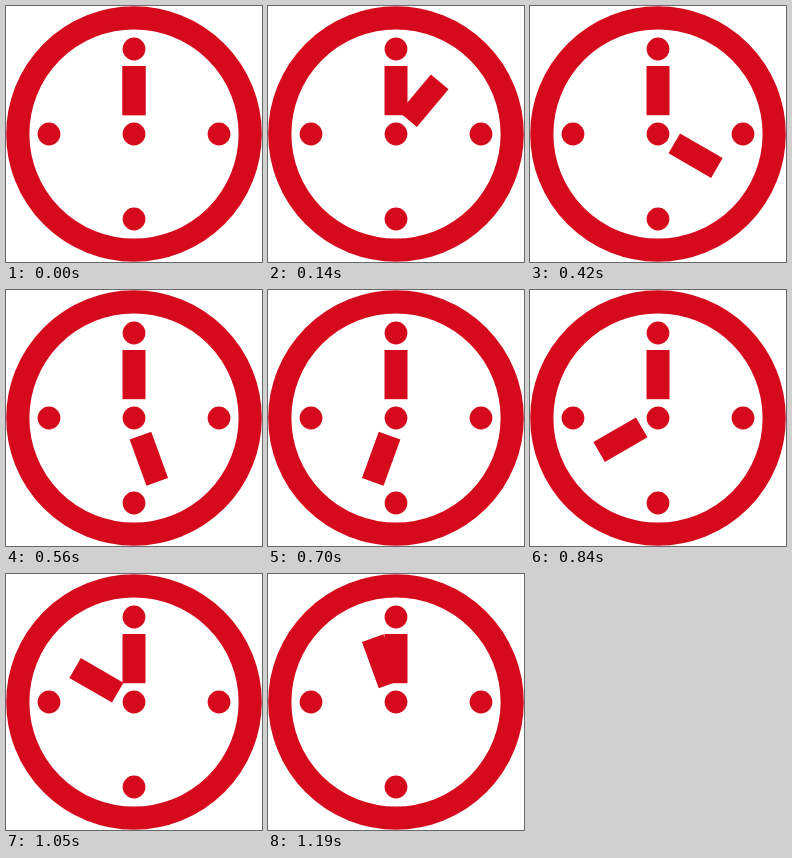
An HTML page for the animation above (1.26 s loop, 256 by 256 pixels).

```html
<!DOCTYPE html>
<html lang="en">
<head>
<meta charset="utf-8">
<title>Clock</title>
<style>
  html, body { margin: 0; width: 100%; height: 100%; overflow: hidden; background: #fff; }
  svg { display: block; width: 100%; height: 100%; }
</style>
</head>
<body>
<svg viewBox="-128 -128 256 256" fill="#d50b1d">
  <circle r="116.2" fill="none" stroke="#d50b1d" stroke-width="23.2"/>
  <circle r="11.4"/>
  <circle cy="-85" r="11.4"/>
  <circle cx="85" r="11.4"/>
  <circle cy="85" r="11.4"/>
  <circle cx="-85" r="11.4"/>
  <rect x="-11.5" y="-68" width="23" height="49.2"/>
  <rect id="hand" x="-11.5" y="-68" width="23" height="49.2"/>
</svg>
<script>
  const STEP = 70, STEPS = 18;
  const hand = document.getElementById('hand');
  const start = performance.now();

  // The hour hand ticks round in 18 equal jumps.
  function draw(now) {
    const step = Math.floor(Math.max(0, now - start) / STEP) % STEPS;
    hand.setAttribute('transform', `rotate(${step * 360 / STEPS})`);
    requestAnimationFrame(draw);
  }
  draw(start);
</script>
</body>
</html>
```
